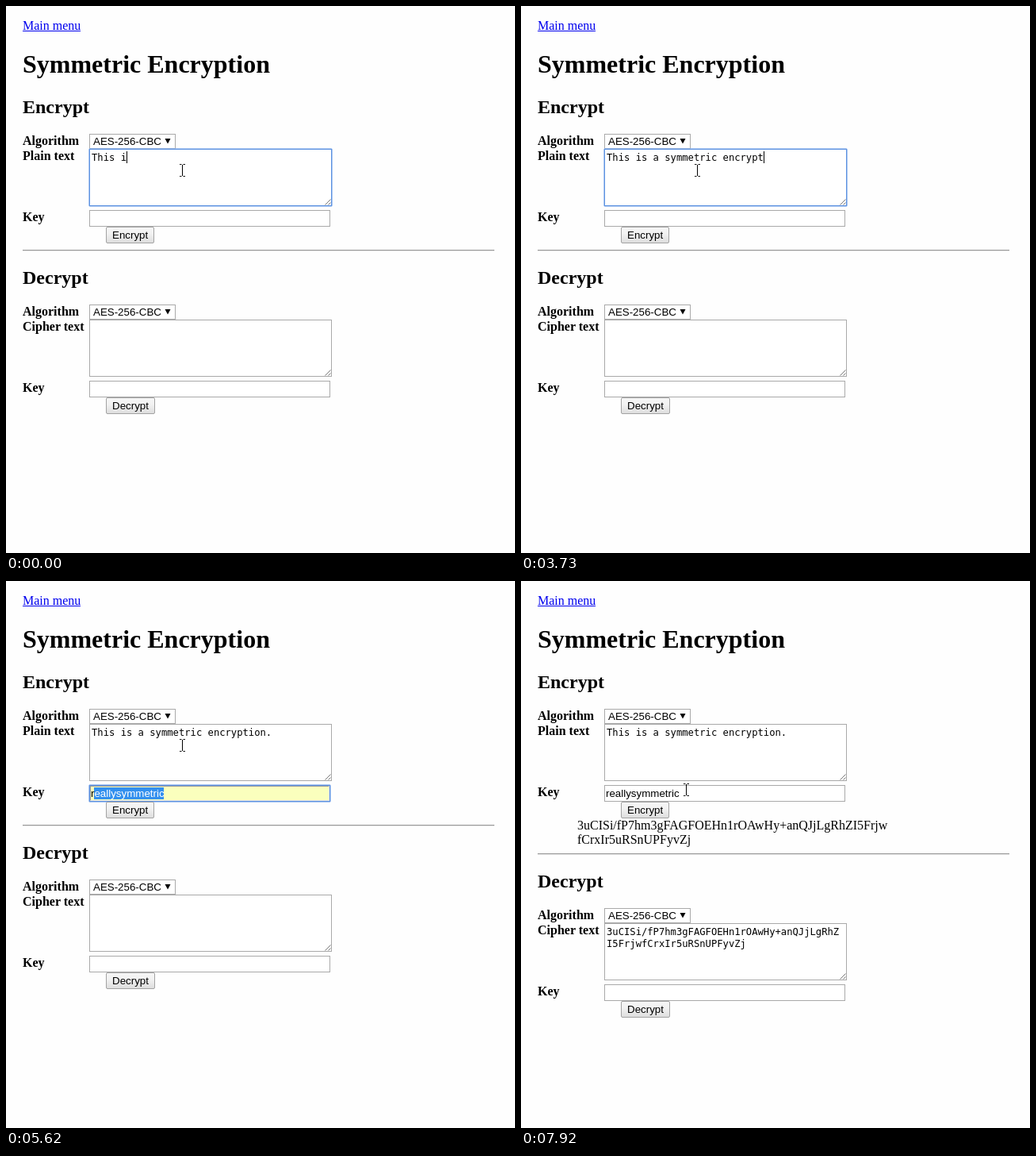
Recreate the animation shown at these times as an HTML page. Size 642 by 689 pixels, loop 8000 ms.

```html
<!DOCTYPE html>
<html lang="en">
<head>
<meta charset="utf-8">
<title>Symmetric Encryption</title>
<style>
  html, body { margin: 0; width: 100%; height: 100%; overflow: hidden; background: #fefefe; }
  svg { display: block; }
  text { white-space: pre; }
  .serif { font: 16px "Liberation Serif", serif; }
  .label { font: bold 16px "Liberation Serif", serif; }
  .h1 { font: bold 32px "Liberation Serif", serif; }
  .h2 { font: bold 24px "Liberation Serif", serif; }
  .ui { font: 13.333px "Liberation Sans", sans-serif; }
  .mono { font: 12.18px "DejaVu Sans Mono", monospace; }
  .hint { font: bold 11px "Open Sans", sans-serif; }
  .box { fill: #fff; stroke: #a9a9a9; }
  .ring { fill: none; stroke: #5d92e0; }
  .glow { fill: none; stroke: #8fb4ee; stroke-opacity: .75; }
</style>
</head>
<body>
<svg id="stage" width="642" height="689" viewBox="0 0 642 689">
  <defs>
    <linearGradient id="face" x1="0" y1="0" x2="0" y2="1">
      <stop offset="0" stop-color="#f6f6f6"/>
      <stop offset=".4" stop-color="#f2f2f2"/>
      <stop offset="1" stop-color="#dddddd"/>
    </linearGradient>
  </defs>
</svg>
<script>
const LOOP = 8000;
const PLAIN = "This is a symmetric encryption.";
const KEY = "reallysymmetric";
const CIPHER = "3uCISi/fP7hm3gFAGFOEHn1rOAwHy+anQJjLgRhZI5FrjwfCrxIr5uRSnUPFyvZj";
const CHAR_W = 7.333;

// One entry per typed character
const KEYSTROKES = [
  160, 330, 490, 660, 830, 990, 1240, 1360, 1490,
  1780, 1930, 2060, 2240, 2420, 2600, 2770, 2900, 3050,
  3330, 3530, 3730, 3880, 4000, 4000, 4280
];
const KEY_FOCUS = 4540, KEY_TYPED = 4810, PREVIEW = 5360, ACCEPT = 5620,
      DESELECT = 5750, CLICK = 6790, RESULT = 6950;

// time, x, y, shape
const POINTER = [
  [0, 222, 207, "beam"],
  [6150, 219, 213, "beam"],
  [6280, 209, 228, "beam"],
  [6410, 195, 246, "beam"],
  [6540, 181, 266, "beam"],
  [6670, 171, 282, "arrow"],
  [6790, 167, 286, "arrow"],
  [7390, 178, 345, "arrow"],
  [7570, 194, 391, "arrow"],
  [7740, 199, 340, "arrow"],
  [7920, 208, 263, "beam"]
];

const stage = document.getElementById("stage");

function el(parent, tag, attrs = {}, content) {
  const node = document.createElementNS("http://www.w3.org/2000/svg", tag);
  for (const name in attrs) node.setAttribute(name, attrs[name]);
  if (content !== undefined) node.textContent = content;
  parent.appendChild(node);
  return node;
}
const text = (g, cls, x, y, s) => el(g, "text", { class: cls, x, y }, s);
const fill = (g, x, y, width, height, color) =>
  el(g, "rect", { x, y, width, height, fill: color });
// Outline whose 1px stroke lies just inside the given box
const frame = (g, cls, x, y, w, h, rx = 0) =>
  el(g, "rect", { class: cls, x: x + .5, y: y + .5, width: w - 1, height: h - 1, rx });
const show = (node, on) => node.setAttribute("visibility", on ? "visible" : "hidden");

function focusRing(g, x, y, w, h) {
  const ring = el(g, "g");
  frame(ring, "glow", x - 1, y - 1, w + 2, h + 2, 1.5);
  frame(ring, "ring", x, y, w, h);
  return ring;
}

function button(g, y, w, label) {
  const face = el(g, "rect", {
    x: 126.5, y: y + .5, width: w - 1, height: 20, rx: 1.5,
    fill: "url(#face)", stroke: "#a3a3a3"
  });
  text(g, "ui", 134, y + 15, label);
  return face;
}

function form(g, top, title, areaLabel) {
  text(g, "h2", 21, top, title);
  text(g, "label", 21, top + 40, "Algorithm");
  text(g, "label", 21, top + 59, areaLabel);
  text(g, "label", 21, top + 136, "Key");
  frame(g, "box", 105, top + 26, 109, 19);
  text(g, "ui", 110, top + 40, "AES-256-CBC");
  el(g, "path", { d: `M200.5 ${top + 32}h7l-3.5 6.5z` });
  frame(g, "box", 105, top + 45, 306, 72);
  el(g, "path", {
    d: `M402.5 ${top + 115.5}l7-7M406.5 ${top + 115.5}l3-3`,
    stroke: "#777", fill: "none"
  });
  frame(g, "box", 105, top + 122, 304, 21);
}

text(stage, "serif", 21, 30, "Main menu").setAttribute("fill", "#0000ee");
fill(stage, 21, 31, 73, 1, "#0000ee");
text(stage, "h1", 21, 84, "Symmetric Encryption");

// Encrypt form
form(stage, 135, "Encrypt", "Plain text");
const plain = text(stage, "mono", 108, 195, "");
const areaRing = focusRing(stage, 105, 180, 306, 72);
const areaCaret = fill(stage, 0, 183, 1, 15, "#000");

const autofill = el(stage, "g");
fill(autofill, 105, 257, 304, 21, "#faffbd");
el(autofill, "path", { d: "M105 278v-21h304l-2 2h-300v17z", fill: "#9a9a9a" });
el(autofill, "path", { d: "M105 278h304v-21l-2 2v17h-300z", fill: "#e6e6e6" });
const keyRing = focusRing(stage, 105, 257, 304, 21);
const selection = fill(stage, 111, 260, 88, 15, "#3390ee");
const keyText = text(stage, "ui", 107, 272);
const keyHead = el(keyText, "tspan");
const keyTail = el(keyText, "tspan");
const keyCaret = fill(stage, 0, 260, 1, 15, "#000");
const encryptFace = button(stage, 278, 61, "Encrypt");

const result = el(stage, "g");
text(result, "serif", 71, 313, CIPHER.slice(0, 46));
text(result, "serif", 71, 331, CIPHER.slice(46));

// Decrypt form, pushed down once the result is printed
const lower = el(stage, "g");
fill(lower, 21, 307, 595, 1, "#9a9a9a");
fill(lower, 21, 308, 595, 1, "#e2e2e2");
form(lower, 350, "Decrypt", "Cipher text");
button(lower, 493, 62, "Decrypt");
const cipher = el(lower, "g");
text(cipher, "mono", 108, 410, CIPHER.slice(0, 40));
text(cipher, "mono", 108, 425, CIPHER.slice(40));

const popup = el(stage, "g");
frame(popup, "box", 105, 278, 304, 26).style.stroke = "#c4c4c4";
const popupRow = fill(popup, 106, 279, 302, 24, "#cdcdcd");
text(popup, "hint", 114, 295, KEY);

const pointers = {
  beam: el(stage, "path", {
    d: "M-3 -7.5H-.5M1.5 -7.5H4M.5 -7V7M-3 7.5H-.5M1.5 7.5H4",
    stroke: "#000", fill: "none"
  }),
  arrow: el(stage, "path", {
    d: "M.5 .5V16.5L4.3 12.9L6.8 18.5L9.2 17.5L6.8 12H11.8Z",
    fill: "#fff", stroke: "#000"
  })
};

function render(t) {
  const typed = 6 + KEYSTROKES.filter(k => k <= t).length;
  plain.textContent = PLAIN.slice(0, typed);
  const inArea = t < KEY_FOCUS;
  show(areaRing, inArea);
  show(areaCaret, inArea);
  areaCaret.setAttribute("x", Math.round(108 + CHAR_W * typed));

  const inKey = !inArea && t < CLICK;
  const selected = t >= PREVIEW && t < DESELECT;
  const done = t >= RESULT;
  show(keyRing, inKey);
  show(autofill, t >= PREVIEW && !done);
  show(selection, selected);
  keyHead.textContent = t >= KEY_TYPED ? KEY[0] : "";
  keyTail.textContent = t >= PREVIEW ? KEY.slice(1) : "";
  keyTail.setAttribute("fill", selected ? "#fff" : "#000");
  show(keyCaret, inKey && !selected);
  keyCaret.setAttribute("x", t >= DESELECT ? 199 : t >= KEY_TYPED ? 111 : 107);

  const open = t >= KEY_TYPED && t < ACCEPT;
  popup.style.display = open ? "" : "none";
  show(popupRow, t >= PREVIEW);

  show(result, done);
  show(cipher, done);
  lower.setAttribute("transform", `translate(0 ${done ? 36 : 0})`);

  const [, x, y, shape] = POINTER.filter(p => p[0] <= t).pop();
  for (const name in pointers) show(pointers[name], name === shape);
  pointers[shape].setAttribute("transform", `translate(${x} ${y})`);
  const hover = t >= 6670 && t < 7390;
  encryptFace.setAttribute("stroke", hover ? "#7c7c7c" : "#a3a3a3");
}

const start = performance.now();
function tick() {
  render((performance.now() - start) % LOOP);
  requestAnimationFrame(tick);
}
tick();
</script>
</body>
</html>
```
